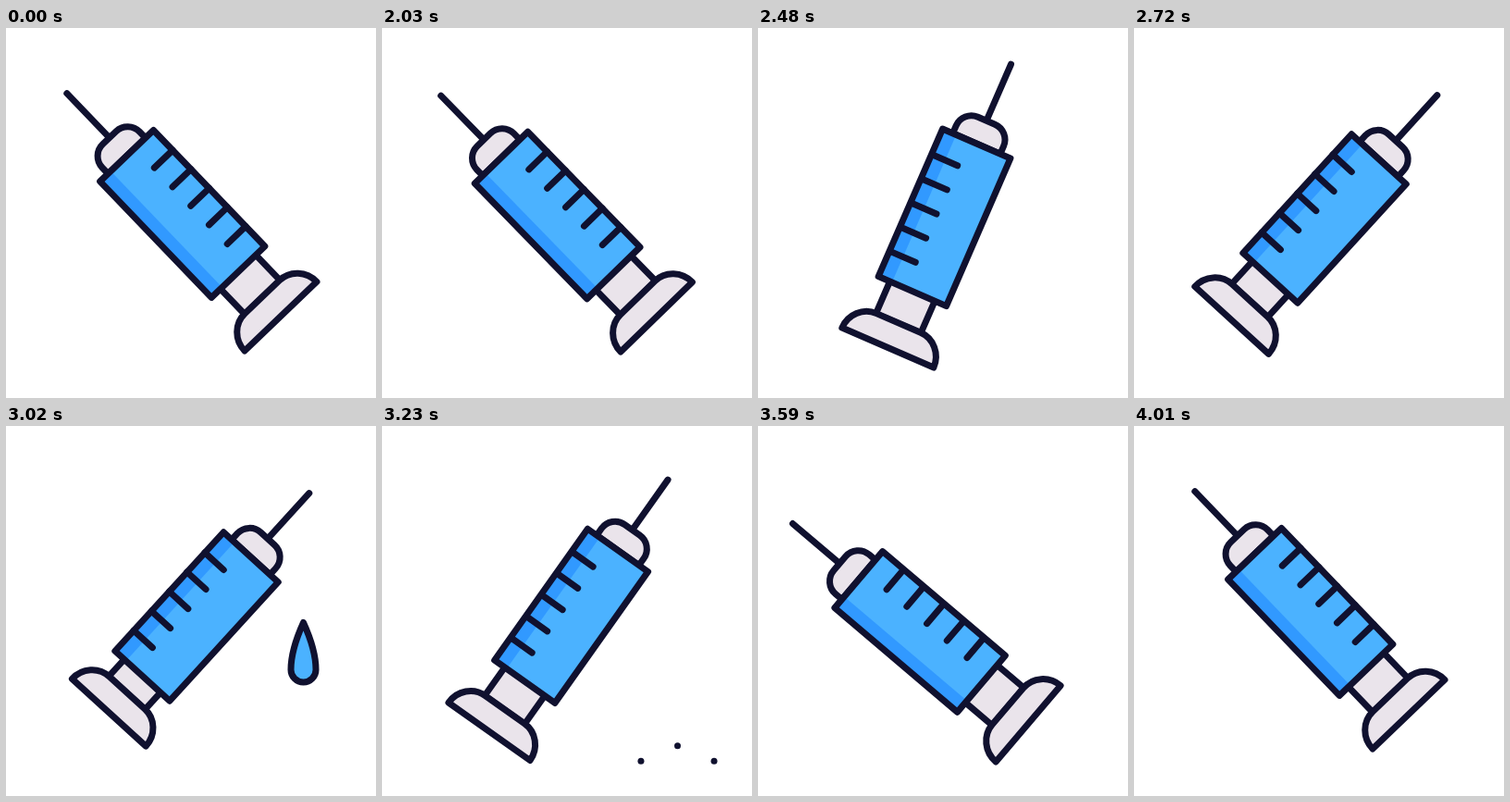
Recreate the animation shown at these times as an HTML page. Size 400 px wide and 400 px high, loop 4.04 s.

```html
<!DOCTYPE html>
<html lang="en">
<head>
<meta charset="utf-8">
<title>Syringe</title>
<style>
  html, body { margin: 0; width: 100%; height: 100%; overflow: hidden; background: #fff; }
  svg { display: block; width: 100vw; height: 100vh; }
  .line { stroke: #10112f; stroke-width: 7; stroke-linecap: round; stroke-linejoin: round; }
  .pale { fill: #eae4eb; }
  .blue { fill: #4bb2ff; }
  .shade { fill: #3199ff; }
  .none { fill: none; }
  .dot { fill: #10112f; }
</style>
</head>
<body>
<svg viewBox="0 0 400 400">
  <!-- Syringe, needle up, origin at the middle of the barrel -->
  <g id="syringe">
    <g id="plunger" class="line pale">
      <path d="M-26.5 60H26.5V125H-26.5Z"/>
      <path d="M-54 153.5A28 29 0 0 1 -26 124.5H26A28 29 0 0 1 54 153.5Z"/>
    </g>
    <path class="line none" d="M0 -113V-180.5"/>
    <path class="line pale" d="M-28 -87V-96A18 18 0 0 1 -10 -114H10A18 18 0 0 1 28 -96V-87Z"/>
    <path class="blue" d="M-40 -87H40V87H-40Z"/>
    <path class="shade" d="M-40 -87H-24V87H-40Z"/>
    <path id="ticks" class="line none"/>
    <path class="line none" d="M-40 -87H40V87H-40Z"/>
  </g>
  <path id="drop" class="line blue" d="M0 0C5 11 13.5 33 13.5 51A13.5 13.5 0 0 1 -13.5 51C-13.5 33 -5 11 0 0Z"/>
  <g id="splash" class="dot"><circle/><circle/><circle/></g>
</svg>
<script>
const LOOP = 4040, STEP = 30, FIRST = 20;
const PIVOT = { x: -7, y: 24 };
const REST = { a: -43.8, x: 202.3, y: 223.1 };
const LEFT = { a: -50, x: 188.9, y: 243.4 };
const RIGHT = { a: 42.4, x: 184.7, y: 219 };
const MOVES = [
  [2000, 2175, REST, LEFT],
  [2175, 2610, LEFT, RIGHT],
  [3148, 3608, RIGHT, LEFT],
  [3608, 4010, LEFT, REST],
];
const SPLASH = [[-68.5, -39.5], [0, -68], [68.5, -39.5]];

const el = id => document.getElementById(id);
const syringe = el('syringe'), plunger = el('plunger'), ticks = el('ticks');
const drop = el('drop'), dots = [...el('splash').children];

const part = (t, from, to) => Math.min(1, Math.max(0, (t - from) / (to - from)));
const sine = p => (1 - Math.cos(Math.PI * p)) / 2;
const mix = (a, b, p) => a + (b - a) * p;
const show = (node, on) => node.setAttribute('visibility', on ? 'visible' : 'hidden');

ticks.setAttribute('d', [-57, -28.5, 0, 28.5, 57].map(y => `M-40 ${y}h27.5`).join(''));

function pose(t) {
  let now = REST;
  for (const [from, to, a, b] of MOVES) {
    if (t < from) break;
    const p = sine(part(t, from, to));
    now = { a: mix(a.a, b.a, p), x: mix(a.x, b.x, p), y: mix(a.y, b.y, p) };
  }
  return now;
}

// The marks roll across the barrel: 0 at the left edge, 1 at the right
function roll(t) {
  const p = t < 2900 ? 1 - part(t, 2175, 2610) : part(t, 3148, 3608);
  return Math.min(1, 1.08 * p ** 2.4);
}

function drawDrop(t) {
  const fall = 138 * ((t - 2770) / 250) ** 2;
  const size = sine(part(t, 2770, 2920));
  show(drop, t > 2770 && t < 3110);
  drop.setAttribute('transform', `translate(321.5 ${74.5 + fall}) scale(${size})`);
}

function drawSplash(t) {
  const p = part(t, 3110, 3453);
  const out = 1 - (1 - p) ** 2;
  dots.forEach((dot, i) => {
    const [dx, dy] = SPLASH[i];
    show(dot, p > 0 && p < 1);
    dot.setAttribute('cx', 319.5 + dx * out);
    dot.setAttribute('cy', 385 + dy * out);
    dot.setAttribute('r', 3.5 * (1 - part(p, 0.85, 1)));
  });
}

function draw(time) {
  const raw = time % LOOP;
  const t = Math.floor((raw - FIRST) / STEP) * STEP + FIRST;
  const { a, x, y } = pose(t);
  const press = 13 * sine(part(t, 2610, 2880)) * (1 - sine(part(t, 3060, 3250)));
  syringe.setAttribute('transform',
    `translate(${x} ${y}) rotate(${a}) translate(${-PIVOT.x} ${-PIVOT.y})`);
  plunger.setAttribute('transform', `translate(0 ${-press})`);
  ticks.setAttribute('transform', `translate(${52.5 * roll(t)} 0)`);
  drawDrop(t);
  drawSplash(t);
}

const start = performance.now();
function frame() {
  draw(performance.now() - start);
  requestAnimationFrame(frame);
}
frame();
</script>
</body>
</html>
```
